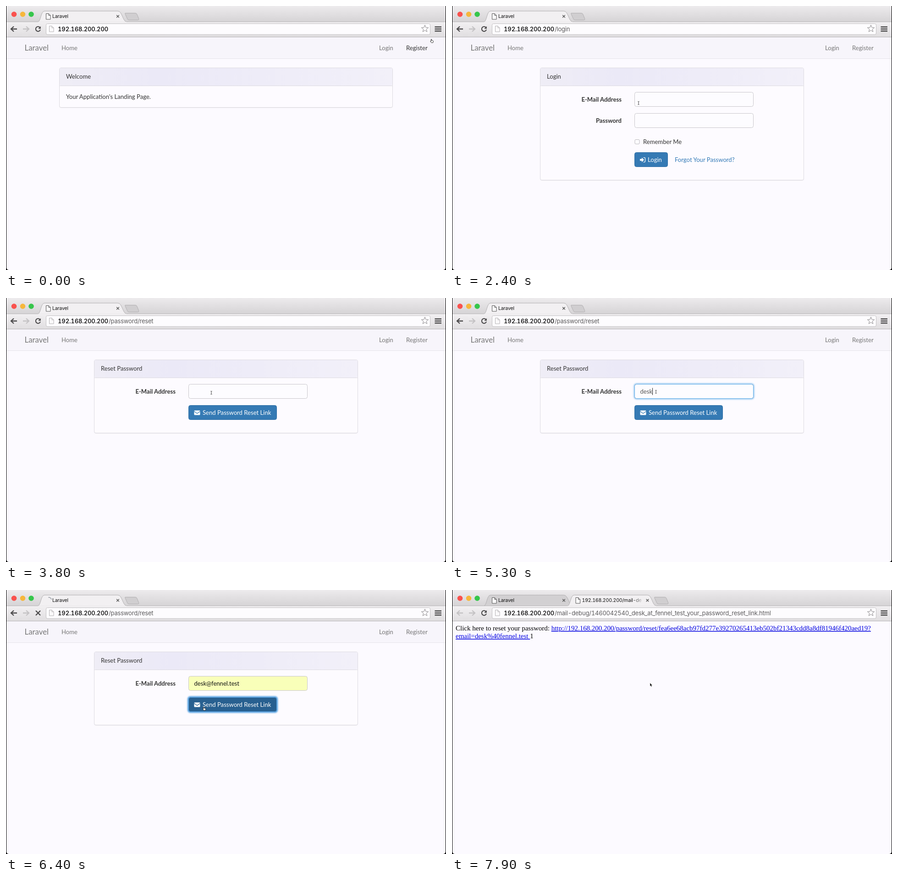
An HTML page that plays this animation: 960 px wide and 574 px high, repeating every 8 s.

```html
<!DOCTYPE html>
<html lang="en">
<head>
<meta charset="utf-8">
<title>Password reset</title>
<style>
  html, body { margin: 0; width: 100%; height: 100%; overflow: hidden; background: #000; }
  svg { display: block; width: 960px; height: 574px; }
  text { white-space: pre; }
  .page { font: 13.1px Lato, sans-serif; fill: #333; }
  .bold { font-weight: 700; }
  .ui { font-family: Inter, sans-serif; font-feature-settings: "tnum"; }
  .tab { font-size: 10.6px; letter-spacing: -.2px; }
  .host { font-size: 13px; font-weight: 500; letter-spacing: -.1px; fill: #000; }
  .path { font-size: 13px; letter-spacing: -.19px; fill: #5c5b5c; }
  .mail { font: 14.97px "Liberation Serif", "Times New Roman", serif; fill: #000; }
  .mail .link { fill: #0000e0; text-decoration: underline; text-decoration-skip-ink: none; }
</style>
</head>
<body>
<svg viewBox="0 0 960 574">
  <defs>
    <linearGradient id="title" x2="0" y2="1"><stop stop-color="#edebed"/><stop offset="1" stop-color="#d5d3d5"/></linearGradient>
    <linearGradient id="bar" x2="0" y2="1"><stop stop-color="#f2f0f2"/><stop offset="1" stop-color="#e0dee0"/></linearGradient>
    <linearGradient id="head"><stop stop-color="#efedf6"/><stop offset=".3" stop-color="#ebe9f7"/><stop offset="1" stop-color="#f2f0f9"/></linearGradient>
    <linearGradient id="fade" gradientUnits="userSpaceOnUse" x1="394" x2="418" y1="0" y2="0"><stop stop-color="#111"/><stop offset="1" stop-color="#111" stop-opacity="0"/></linearGradient>
    <filter id="blur" x="-10%" y="-50%" width="120%" height="200%"><feGaussianBlur stdDeviation="1.8"/></filter>
  </defs>
  <g id="view"></g>
</svg>
<script>
const LOOP = 8000;
const EMAIL = 'desk@fennel.test';
const TOKEN = 'fea6ee68acb97fd277e39270265413eb502bf21343cdd8a8df81946f420aed19';
const PATHS = {
  home: '', login: '/login', reset: '/password/reset',
  mail: '/mail-debug/1460042540_desk_at_fennel_test_your_password_reset_link.html'
};
const T = { login: 1500, reset: 3200, focus: 4000, filled: 5900, submit: 6200, tab: 6800, loaded: 7200 };

// time, x, y, pointer kind from then on
const POINTER = [
  [0, 929, 76, 'hand'], [700, 829, 91, 'hand'], [1100, 811, 94, 'hand'],
  [1500, 811, 94, 'arrow'], [2200, 430, 206, 'beam'], [2350, 407, 211, 'beam'],
  [2500, 407, 211, 'beam'], [2600, 435, 242, 'arrow'], [2800, 512, 334, 'hand'],
  [3200, 512, 334, 'arrow'], [3600, 452, 212, 'beam'], [3800, 448, 206, 'beam'],
  [5100, 448, 206, 'beam'], [5300, 445, 204, 'beam'], [5700, 445, 204, 'beam'],
  [5900, 437, 238, 'hand'], [6100, 432, 258, 'hand'], [6800, 433, 258, 'arrow'],
  [7300, 433, 258, 'arrow'], [7800, 434, 206, 'arrow'], [8000, 434, 206, 'arrow']
];

const view = document.getElementById('view');
const meter = document.createElement('canvas').getContext('2d');
const clamp = v => Math.max(0, Math.min(1, v));

const text = (x, y, s, attrs = '') => `<text x="${x}" y="${y}" ${attrs}>${s}</text>`;
const rect = (x, y, w, h, r, fill, stroke = 'none', attrs = '') =>
  `<rect x="${x}" y="${y}" width="${w}" height="${h}" rx="${r}" fill="${fill}" stroke="${stroke}" ${attrs}/>`;
const path = (d, fill, stroke = 'none', width = 1, attrs = '') =>
  `<path d="${d}" fill="${fill}" stroke="${stroke}" stroke-width="${width}" ${attrs}/>`;
const dot = (x, y, fill) => `<circle cx="${x}" cy="${y}" r="5.8" fill="${fill}"/>`;
const cross = (x, y, r, color, width) =>
  path(`M${x - r} ${y - r}l${2 * r} ${2 * r}m0 ${-2 * r}l${-2 * r} ${2 * r}`, 'none', color, width);
const sheet = (x, y, stroke) =>
  path(`M${x} ${y}h5.5l4 4v8.5h-9.5zM${x + 5.5} ${y}v4h4`, '#fbfafb', stroke);

function spinner(x, y, t) {
  return path('M0 -6A6 6 0 0 1 6 0', 'none', '#9a9fa8', 1.6,
    `transform="translate(${x} ${y}) rotate(${-(t - 6400) * 0.72 - 10})"`);
}

function pointerAt(t) {
  const i = POINTER.findLastIndex(k => k[0] <= t);
  const a = POINTER[i], b = POINTER[i + 1] || a;
  const p = clamp((t - a[0]) / (b[0] - a[0] || 1));
  const e = p * p * (3 - 2 * p);
  return { x: a[1] + (b[1] - a[1]) * e, y: a[2] + (b[2] - a[2]) * e, kind: a[3] };
}

function drawPointer({ x, y, kind }) {
  const at = `transform="translate(${x.toFixed(2)} ${y.toFixed(2)})"`;
  if (kind === 'beam')
    return path('M-1.6 -3.5q1.6 0 1.6 1v5q0 1 -1.6 1M1.6 -3.5q-1.6 0 -1.6 1M0 2.5q0 1 1.6 1', 'none', '#333', .9, at);
  if (kind === 'hand')
    return path('M-1.6 -3.6q1 -.8 1.4 .3v2l2.8 .7q1 .4 .8 1.6l-.8 2.8h-3.5l-2.3 -3q0 -1.2 1.6 -.2z', '#fff', '#222', .9, at);
  return path('M-2 -4v7.2l1.6 -1.4 1.2 2.8 1.3 -.6 -1.2 -2.6h2.2z', '#111', '#fff', .4, at);
}

function drawTab(x, title, active, busy, t, fill = '#111') {
  return path(`M${x} 34.5C${x + 6} 33 ${x + 6} 11 ${x + 14} 11H${x + 174}C${x + 184} 11 ${x + 184} 33 ${x + 193} 34.5`,
      active ? '#f2f0f2' : '#d2d0d2', '#b1afb1')
    + (busy ? spinner(x + 23.5, 22, t) : sheet(x + 17.5, 16.5, '#555'))
    + text(x + 31, 26, title, `class="ui tab" fill="${fill}"`)
    + cross(x + 174, 22.5, 2.8, '#555', 1.4);
}

function drawChrome(t, page) {
  const second = page === 'mail';
  const busy = (t >= 1300 && t < T.login) || (t >= 3000 && t < T.reset) || (t >= T.submit && t < T.loaded);
  const loaded = t >= T.loaded;
  const slide = 24 * (1 - clamp((t - T.tab + 65) / 220));
  const plus = second ? 442 : 260;
  const left = second ? 252.5 : 70;
  const dim = '#c4c2c4', ink = '#4b4a4b';
  const arrow = (x, dir, color) =>
    path(`M${x} 50h${-dir * 13}M${x - dir * 6} 44.5l${dir * 6} 5.5 ${-dir * 6} 5.5`, 'none', color, 2.3);

  let s = rect(1, 0, 958, 35, 0, 'url(#title)')
    + dot(17.5, 18, '#f9524e') + dot(36.5, 18, '#f6b73c') + dot(55, 18, '#36c64b')
    + path(`M${plus} 15.5h22q3 0 4 3l3.6 9q1 3 -2 3h-19q-3 0 -4 -3l-4.6 -10q-1 -2 0 -2z`, '#d0ced0', '#b1afb1')
    + drawTab(70, 'Laravel', !second, busy && !second, t);
  if (second)
    s += `<g transform="translate(0 ${slide.toFixed(2)})">`
      + drawTab(left, loaded ? '192.168.200.200/mail-de' : 'Untitled', true, !loaded, t, loaded ? 'url(#fade)' : '#111')
      + '</g>';
  s += rect(1, 34.5, 958, 33, 0, 'url(#bar)')
    + path(`M1 34.5H${left}M${left + 193} 34.5H959`, 'none', '#bab8ba')
    + path('M1 67.5H959', 'none', '#b5b3b5')
    + arrow(11, -1, second ? dim : ink) + arrow(50, 1, dim)
    + (busy ? cross(70, 50, 5, ink, 2.4)
      : path('M74.2 46.8A5.2 5.2 0 1 0 75 51.5', 'none', ink, 2.1) + path('M75.8 44v5.6h-5.6z', ink))
    + rect(87.5, 38.5, 838, 23.5, 3, '#fdfcfe', '#c3c1c3')
    + sheet(94.5, 43.5, '#b3b1b3')
    + text(113, 55, '192.168.200.200', 'class="ui host"')
    + text(224, 55, PATHS[page], 'class="ui path"');
  const star = [...Array(10)].map((_, i) => {
    const r = i % 2 ? 3.4 : 8, a = i * Math.PI / 5;
    return `${(914 + r * Math.sin(a)).toFixed(1)} ${(49.5 - r * Math.cos(a)).toFixed(1)}`;
  }).join('L');
  return s + path(`M${star}z`, 'none', '#8c8a8c')
    + path('M935.5 45.5h14.5M935.5 50h14.5M935.5 54.5h14.5', 'none', ink, 2.6);
}

function drawNav(hover) {
  const link = (x, s) => text(x, 95.5, s, `style="fill:${hover === s ? '#333' : '#777'}"`);
  return rect(1, 68, 958, 46, 0, '#f7f5fb') + path('M1 114.5H959', 'none', '#e6e4ea')
    + text(40.5, 97, 'Laravel', 'style="font-size:16.84px;fill:#777"')
    + link(121, 'Home') + link(814, 'Login') + link(873, 'Register');
}

function panel(x, w, h, title) {
  return rect(x, 135.5, w, h, 3.5, 'none', '#eeecf0')
    + rect(x, 134.5, w, h, 3.5, '#fdfbff', '#dddbe1')
    + rect(x + .5, 135, w - 1, 38, 3, 'url(#head)')
    + path(`M${x} 173.5h${w}`, 'none', '#dddbe1')
    + text(x + 14.5, 158, title);
}

const label = (y, s) => text(370, y, s, 'class="bold" text-anchor="end"');

function field(y, focus = 0, fill = '#fdfcff') {
  return (focus ? rect(398.5, y, 259, 31, 4, 'none', '#66afe9', `stroke-width="4" opacity="${focus * .7}" filter="url(#blur)"`) : '')
    + rect(398.5, y, 259, 31, 4, fill, '#c9c7cc')
    + (focus ? rect(398.5, y, 259, 31, 4, 'none', '#66afe9', `opacity="${focus}"`) : '');
}

function button(y, w, textX, s, hot, focused) {
  return (focused ? rect(398, y - .5, w + 1, 32, 4, 'none', '#4d9de0', 'stroke-width="4" filter="url(#blur)"') : '')
    + rect(398.5, y, w, 31, 4, hot ? '#286090' : '#357ab4', focused ? '#5ba5e2' : hot ? '#204d74' : '#2e6da4')
    + text(textX, y + 20, s, 'style="fill:#fff"');
}

function drawLogin(hot) {
  return panel(192.5, 575, 244, 'Login')
    + label(207.5, 'E-Mail Address') + field(187.5)
    + label(253.5, 'Password') + field(233.5)
    + rect(399, 290.5, 10, 9.5, 2, '#fdfcff', '#b9b7bb') + text(417, 299.5, 'Remember Me')
    + button(318.5, 72, 427, 'Login')
    + path('M410 332.5h4v-3l5 5 -5 5v-3h-4z', '#fff')
    + path('M417.5 329.7h2.5q1.5 0 1.5 1.5v6.6q0 1.5 -1.5 1.5h-2.5', 'none', '#fff', 1.3)
    + text(486, 338.5, 'Forgot Your Password?', `style="fill:${hot ? '#23527c;text-decoration:underline' : '#337ab7'}"`);
}

function typedAt(t) {
  if (t < 4700) return '';
  const n = t < 5400 ? Math.min(4, 1 + Math.floor((t - 4700) / 130)) : 5 + Math.floor((t - 5400) / 40);
  return EMAIL.slice(0, n);
}

function drawReset(t, hot) {
  const typed = typedAt(t), filled = t >= T.filled, sent = t >= T.submit;
  const focus = clamp((t - T.focus) / 150) * (1 - clamp((t - T.submit) / 150));
  let s = panel(192.5, 575, 159, 'Reset Password')
    + label(207.5, 'E-Mail Address')
    + field(187.5, focus, filled ? '#f9ffb9' : undefined)
    + text(410.5, 207.5, typed, `style="fill:${filled ? '#111' : '#555'}"`);
  const blinkOn = t >= 4700 && t < 5800 || (t - T.focus) % 1000 < 500;
  if (t >= T.focus && !sent && blinkOn) {
    meter.font = '13.1px Lato, sans-serif';
    const x = 411 + meter.measureText(typed).width;
    s += path(`M${x} 195.5v15.5`, 'none', '#222');
  }
  return s + button(233.5, 192, 429, 'Send Password Reset Link', hot, sent)
    + rect(410.5, 244.5, 13, 10, 1.5, '#fff')
    + path('M410.5 246.5l6.5 4.5 6.5 -4.5', 'none', hot ? '#286090' : '#357ab4', 1.2);
}

function drawMail() {
  return `<g class="mail"><text x="8" y="88">Click here to reset your password: `
    + `<tspan class="link">http://192.168.200.200/password/reset/${TOKEN}?</tspan></text>`
    + `<text x="8" y="105"><tspan class="link">email=desk%40fennel.test&#160;</tspan>1</text></g>`;
}

function draw(t) {
  const page = t < T.login ? 'home' : t < T.reset ? 'login' : t < T.tab ? 'reset' : 'mail';
  const pointer = pointerAt(t), hot = pointer.kind === 'hand';
  let s = rect(1, -10, 958, 584, 5, '#fcfaff');
  if (page === 'mail') {
    if (t >= T.loaded) s += drawMail();
  } else {
    const hover = page === 'home' && (pointer.x > 859 ? 'Register' : 'Login');
    s += '<g class="page">' + drawNav(hover);
    if (page === 'home') s += panel(116.5, 727, 86, 'Welcome') + text(131, 201.5, "Your Application's Landing Page.");
    if (page === 'login') s += drawLogin(hot);
    if (page === 'reset') s += drawReset(t, hot);
    s += '</g>';
  }
  view.innerHTML = s + drawChrome(t, page) + drawPointer(pointer);
}

const start = performance.now();
function tick() {
  draw((performance.now() - start) % LOOP);
  requestAnimationFrame(tick);
}
tick();
</script>
</body>
</html>
```
